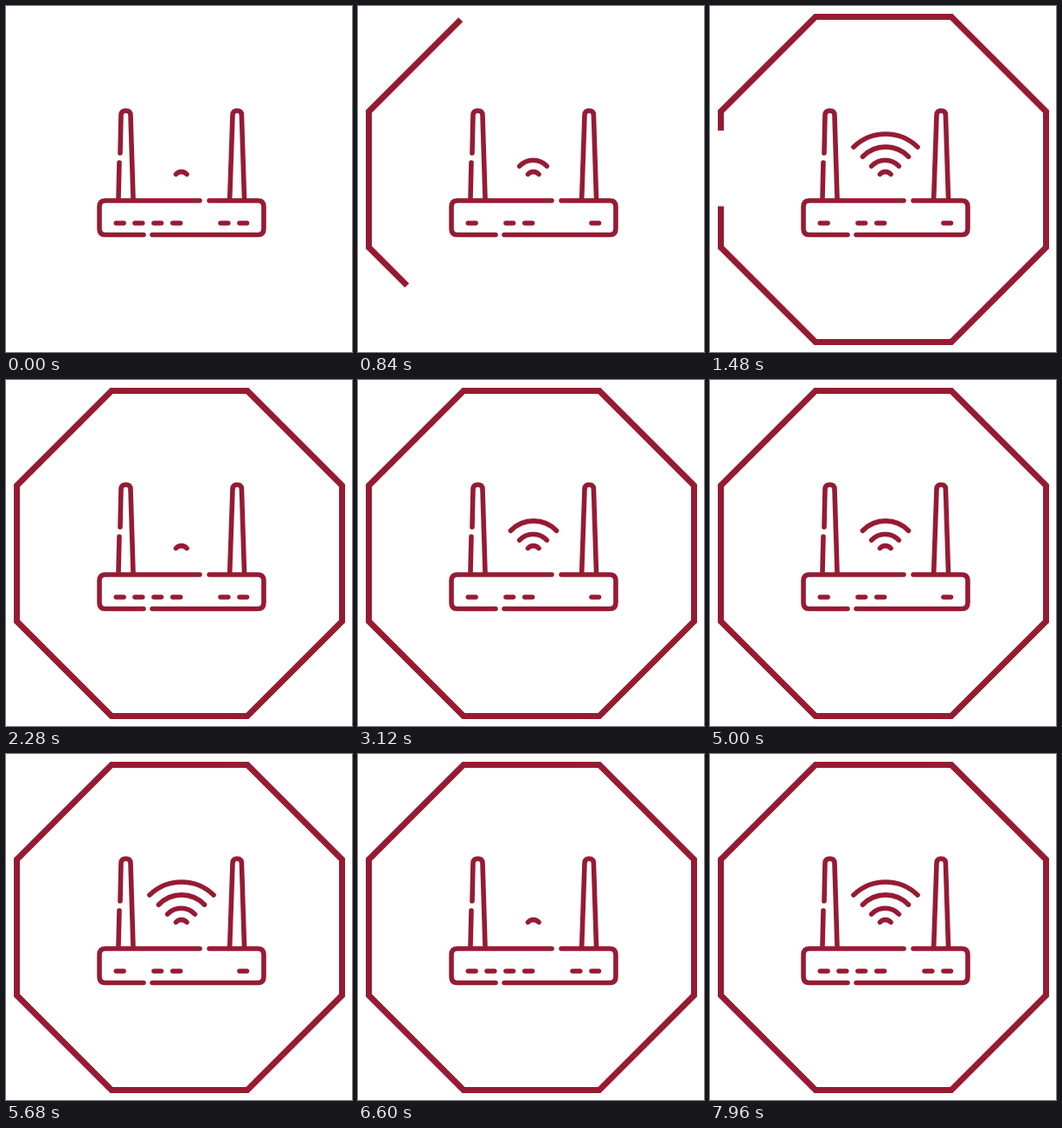
Animation, 400 px wide and 400 px high, one loop 8 s. Source, as an HTML page:

```html
<!DOCTYPE html>
<html lang="en">
<head>
<meta charset="utf-8">
<title>Router</title>
<style>
  html, body { margin: 0; width: 100%; height: 100%; overflow: hidden; background: #fff; }
  svg { display: block; width: 100%; height: 100%; }
  g { fill: none; stroke: #961b32; stroke-width: 5.6; stroke-linecap: round; stroke-linejoin: round; }
  #frame { stroke-width: 7; stroke-linecap: butt; stroke-linejoin: miter; }
</style>
</head>
<body>
<svg viewBox="0 0 400 400">
  <g>
    <path id="frame"/>
    <path d="M224 225H115Q108 225 108 232V257.500Q108 264.500 115 264.500H159"/>
    <path d="M235 225H291Q298 225 298 232V257.500Q298 264.500 291 264.500H169"/>
    <path d="M130 222L131 181M132 170L133 126Q133.200 121 138.500 121Q143.800 121 144 126L147 222"/>
    <path d="M258.700 222L262 126Q262.200 121 267.200 121Q272.200 121 272.400 126L275.500 222"/>
    <path d="M196.500 194.500A8.200 8.200 0 0 1 209 194.500"/>
    <path class="wave" d="M186.700 185.200A21.500 21.500 0 0 1 218.300 185.200"/>
    <path class="wave" d="M176.500 174.300A36.500 36.500 0 0 1 229.500 174.300"/>
    <path class="wave" d="M166 163A53 53 0 0 1 240 163"/>
    <path d="M127.300 251h8.800M171 251h8.500M192.800 251h8.800M270 251h8.500"/>
    <path id="blink" d="M149 251h8.800M248 251h8.800"/>
  </g>
</svg>
<script>
  const LOOP = 8000, CYCLE = 2000, DRAW = 2000;
  const frame = document.getElementById('frame');
  const blink = document.getElementById('blink');
  const waves = document.querySelectorAll('.wave');

  // Clockwise from the lower left corner
  const ring = 'L12.500 279V122L122 12.500H279L388.500 122V279L279 388.500H122';
  const closed = 'M122 388.500' + ring + 'Z';
  const twice = 'M122 388.500' + ring + ring;
  frame.setAttribute('d', twice);
  const around = frame.getTotalLength() / 2;

  const ease = u => u < 0.5 ? 4 * u ** 3 : 1 - 4 * (1 - u) ** 3;
  const show = (el, on) => el.setAttribute('visibility', on ? 'visible' : 'hidden');

  function drawFrame(p) {
    show(frame, p > 0);
    frame.setAttribute('d', p < 1 ? twice : closed);
    if (p < 1) {
      frame.setAttribute('stroke-dasharray', `${around * p} ${around * 3}`);
      frame.setAttribute('stroke-dashoffset', -around * p / 4);
    } else {
      frame.removeAttribute('stroke-dasharray');
      frame.removeAttribute('stroke-dashoffset');
    }
  }

  function render(t) {
    const c = t % CYCLE;
    drawFrame(ease(Math.min(t / DRAW, 1)));
    waves.forEach((w, i) => show(w, c >= CYCLE * (i + 2) / 6));
    show(blink, c < 840 || c >= 1840);
  }

  let start;
  function tick(now) {
    start ??= now;
    render((now - start) % LOOP);
    requestAnimationFrame(tick);
  }
  render(0);
  requestAnimationFrame(tick);
</script>
</body>
</html>
```
